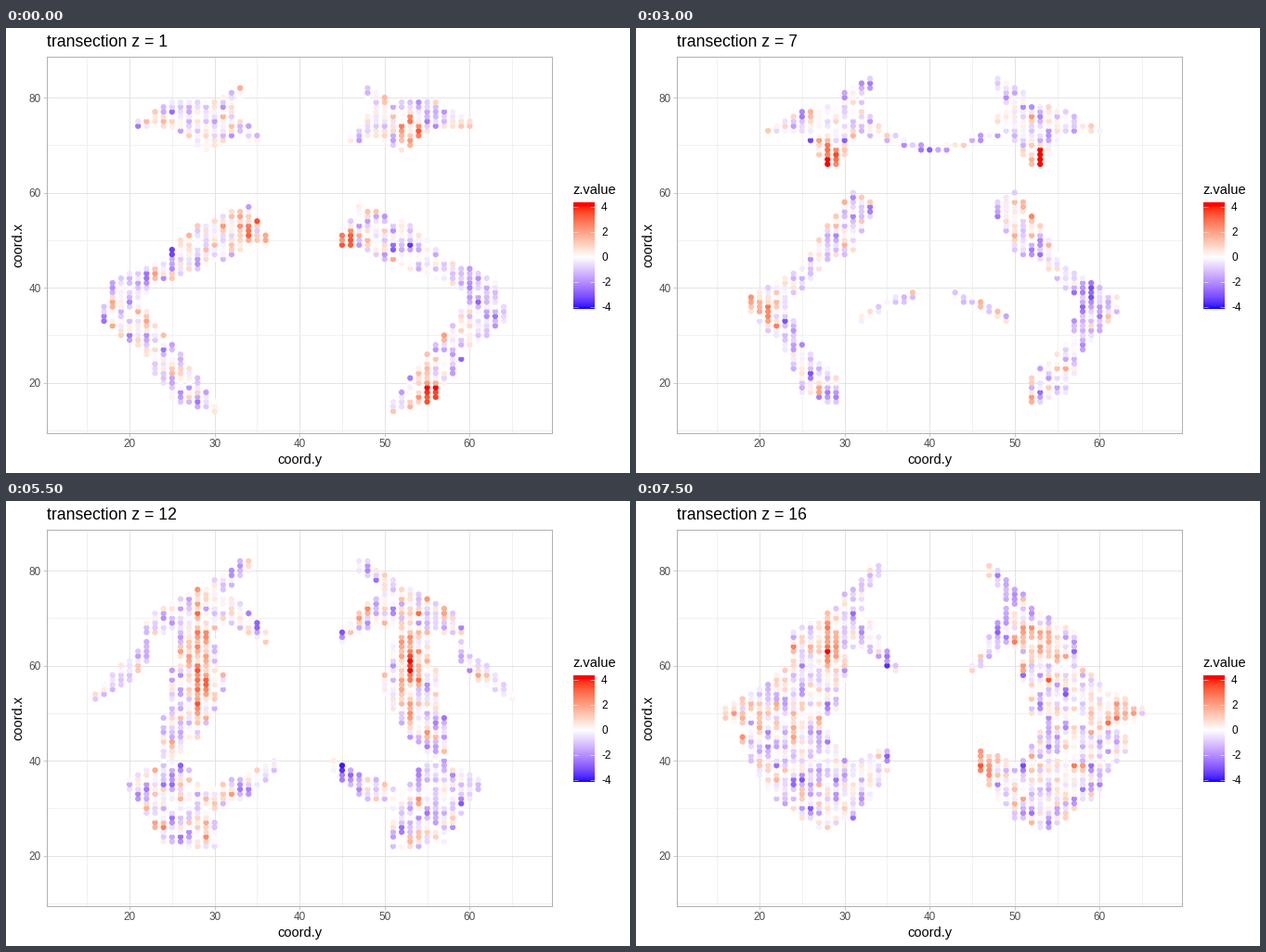
Recreate the animation shown at these times as a matplotlib script. Size 672x480 px, loop 8000 ms.

```python
import numpy as np
import matplotlib.pyplot as plt
from matplotlib.animation import FuncAnimation

plt.rcParams["font.family"] = ["Liberation Sans", "DejaVu Sans"]
plt.rcParams["axes.unicode_minus"] = False

W, H, DPI = 672, 480, 96
SLICES, STEP = 16, 500
LOW, HIGH = -4.1, 4.4
MIRROR = 81  # column x pairs with column MIRROR - x
GRID, MINOR, EDGE, TICK = "#DEDEDE", "#EEEEEE", "#B3B3B3", "#4D4D4D"


class Limb:
    """Left-hand band whose (column, lowest, highest) points glide over z."""

    def __init__(self, **poses):
        self.z = [int(name[1:]) for name in poses]
        self.poses = np.array(list(poses.values()), float)

    def cells(self, z):
        if not self.z[0] <= z <= self.z[-1]:
            return
        x, lo, hi = np.apply_along_axis(
            lambda c: np.interp(z, self.z, c), 0, self.poses).T
        for col in range(round(x[0]), round(x[-1]) + 1):
            bottom, top = np.interp(col, x, lo), np.interp(col, x, hi)
            for row in range(round(bottom), round(top) + 1):
                yield col, row
                yield MIRROR - col, row


crest = Limb(
    z1=[(21, 74, 75), (25, 74, 79), (29, 69, 79), (32, 72, 78), (35, 71, 72)],
    z7=[(21, 73, 73), (25, 73, 77), (28.5, 65, 78), (32, 73, 77), (34, 72, 74)],
    z11=[(21, 68, 69), (25, 69, 75), (29, 69, 77), (32, 70, 75), (36, 67, 69)],
    z16=[(24, 63, 67), (27, 62, 70), (30, 64, 73), (32, 64, 72), (36, 59, 60)])
horn = Limb(
    z1=[(30, 75, 79), (33, 80, 82)],
    z7=[(30, 74, 81), (33, 82, 84)],
    z16=[(30, 70, 75), (34, 79, 81)])
arm = Limb(
    z1=[(18, 34, 41), (24, 42, 46), (28, 44, 53), (34, 49, 57), (36, 49, 51)],
    z7=[(20, 36, 39), (25, 40, 44), (28, 46, 53), (31, 48, 60), (33, 55, 58)],
    z9=[(24, 36, 40), (26, 40, 50), (28, 43, 52), (30, 47, 58), (32, 53, 57)],
    z11=[(24, 37, 44), (26, 41, 66), (28, 44, 69), (30, 50, 66), (31, 52, 56)],
    z16=[(23, 40, 59), (25, 44, 68), (28, 50, 70), (29, 50, 69), (31, 64, 67)])
leg = Limb(
    z1=[(17, 33, 36), (21, 28, 37), (25, 17, 28), (30, 14, 16)],
    z7=[(19, 35, 38), (23, 27, 38), (25, 18, 28), (29, 16, 21)],
    z11=[(21, 34, 37), (24, 22, 39), (27, 21, 36), (31, 17, 20)],
    z13=[(20, 34, 36), (24, 24, 39), (27, 24, 41), (29, 27, 34)],
    z16=[(18, 42, 45), (22, 32, 48), (27, 26, 48), (31, 28, 38)])
inner = Limb(
    z7=[(32, 33, 34), (35, 36, 37), (38, 38, 39)],
    z11=[(29, 30, 32), (34, 33, 36), (38, 39, 40)],
    z16=[(30, 29, 38), (33, 32, 41), (35, 38, 42)])
outer = Limb(
    z11=[(16, 54, 55), (20, 60, 63), (22, 65, 67)],
    z16=[(16, 49, 51), (20, 47, 55), (24, 47, 60)])
arch = Limb(
    z7=[(34, 72, 73), (37, 70, 71), (40, 69, 69)],
    z9=[(34, 71, 72), (37, 69, 69), (39, 68, 68)])
LIMBS = [crest, horn, arm, leg, inner, outer, arch]

# x, y, width, height, value, z at its peak, z reach
SPOTS = [
    (55.3, 17, 1.2, 2.5, 4.4, 1, 4), (34.5, 53, 1.2, 3, 2.6, 1, 3),
    (45.5, 50, 1, 2.5, 2.6, 1, 2), (53, 73, 1.2, 3, 2.4, 2, 5),
    (20, 36, 2, 2, 2.2, 7, 3), (40, 69, 2, 1, -2, 7, 2),
    (58, 36, 1.3, 6, -1.6, 8, 5), (46, 37, 1.5, 2, -2.4, 12, 3),
    (46.5, 40, 1, 3, 2.9, 16, 2), (61, 50, 2, 2, 2, 16, 3),
    (18, 50, 2, 2, 2, 16, 3), (35, 60, 1, 1.5, -2.5, 16, 2)]


def make_noise():
    n = np.random.default_rng(7).normal(size=(SLICES + 1, 100, 80))
    for axis in (0, 1):
        n = n + 0.5 * np.roll(n, 1, axis)
    return n / n.std() - 0.35


NOISE = make_noise()


def bump(x, y, cx, cy, sx, sy):
    return np.exp(-((x - cx) / sx) ** 2 / 2 - ((y - cy) / sy) ** 2 / 2)


def field(x, y, z):
    v = NOISE[z, y, x].copy()
    for cx, cy, sx, sy, peak, when, reach in SPOTS:
        v += peak * max(0, 1 - abs(z - when) / reach) * bump(x, y, cx, cy, sx, sy)
    # Warm core on both sides, longest in the middle slices
    side = np.minimum(x, MIRROR - x)
    core = bump(side, y, 28.2, 60.5 + 0.25 * (z - 12) ** 2,
                0.9, 7 - 0.9 * abs(z - 12))
    return v + 3.6 * np.clip((z - 3) / 4, 0, 1) * core


def lab_ramp(end, t):
    """Blend white to an end colour (given in CIE Lab) and return sRGB."""
    t = np.asarray(t, float)[..., None]
    L, a, b = np.moveaxis((1 - t) * [100, 0, 0] + t * np.array(end), -1, 0)
    fy = (L + 16) / 116
    f = np.stack([fy + a / 500, fy, fy - b / 200], -1)
    xyz = np.where(f > 6 / 29, f ** 3, (f - 4 / 29) * 0.12842)
    xyz = xyz * [0.9505, 1, 1.089]
    rgb = xyz @ np.array([[3.2406, -0.9689, 0.0557],
                          [-1.5372, 1.8758, -0.2040],
                          [-0.4986, 0.0415, 1.0570]])
    rgb = np.clip(rgb, 0, 1)
    return np.where(rgb > 0.0031308, 1.055 * rgb ** (1 / 2.4) - 0.055, 12.92 * rgb)


def colour(v):
    t = np.clip(np.abs(v) / -LOW, 0, 1)
    red, blue = (53.2, 80.1, 67.2), (32.3, 79.2, -107.9)
    return np.where((v > 0)[:, None], lab_ramp(red, t), lab_ramp(blue, t))


def cut(z):
    """Points and colours of one slice."""
    xy = np.array(sorted({c for limb in LIMBS for c in limb.cells(z)}))
    x, y = xy.T
    return xy, colour(field(x, y, z))


fig = plt.figure(figsize=(W / DPI, H / DPI), dpi=DPI, facecolor="white")


def panel(x0, y0, x1, y1):
    return fig.add_axes([x0 / W, 1 - y1 / H, (x1 - x0) / W, (y1 - y0) / H])


def label(x, y, s, size=11, **kw):
    return fig.text(x / W, 1 - y / H, s, fontsize=size, **kw)


ax = panel(44.2, 30.9, 588.2, 437.1)
ax.set(xlim=(10.3, 69.7), ylim=(9.4, 88.6),
       xticks=range(20, 70, 10), yticks=range(20, 90, 20))
ax.set_xticks(range(15, 70, 10), minor=True)
ax.set_yticks(range(10, 80, 20), minor=True)
ax.set_axisbelow(True)
ax.grid(which="major", color=GRID, lw=0.6)
ax.grid(which="minor", color=MINOR, lw=0.6)
ax.tick_params(which="major", length=2.75, width=0.53, color=EDGE,
               labelcolor=TICK, labelsize=8.8, pad=2)
ax.tick_params(which="minor", length=0)
for side in ax.spines.values():
    side.set(color=EDGE, linewidth=0.8)

title = label(44, 20, "", 13.2)
label(316.5, 470, "coord.y", ha="center")
label(13.3, 234, "coord.x", ha="center", va="center", rotation=90)

# Colour bar
bar = panel(611, 187.5, 634, 302.7)
bar.imshow(colour(np.linspace(HIGH, LOW, 200))[:, None], aspect="auto",
           extent=(0, 1, LOW, HIGH))
bar.axis("off")
label(610.5, 179, "z.value")
for v in range(-4, 5, 2):
    bar.hlines([v, v], [0, 0.8], [0.2, 1], color="white", lw=0.4)
    y = 187.5 + (HIGH - v) / (HIGH - LOW) * 115.2
    label(641, y + 4, str(v), 8.8)

dots = ax.scatter([], [], s=22, linewidths=0, zorder=3)
CUTS = [cut(z) for z in range(1, SLICES + 1)]


def draw(i):
    xy, rgb = CUTS[i]
    dots.set_offsets(xy)
    dots.set_facecolor(rgb)
    title.set_text(f"transection z = {i + 1}")
    return dots, title


anim = FuncAnimation(fig, draw, frames=SLICES, interval=STEP, repeat=True,
                     repeat_delay=0, blit=False)
plt.show()
```
